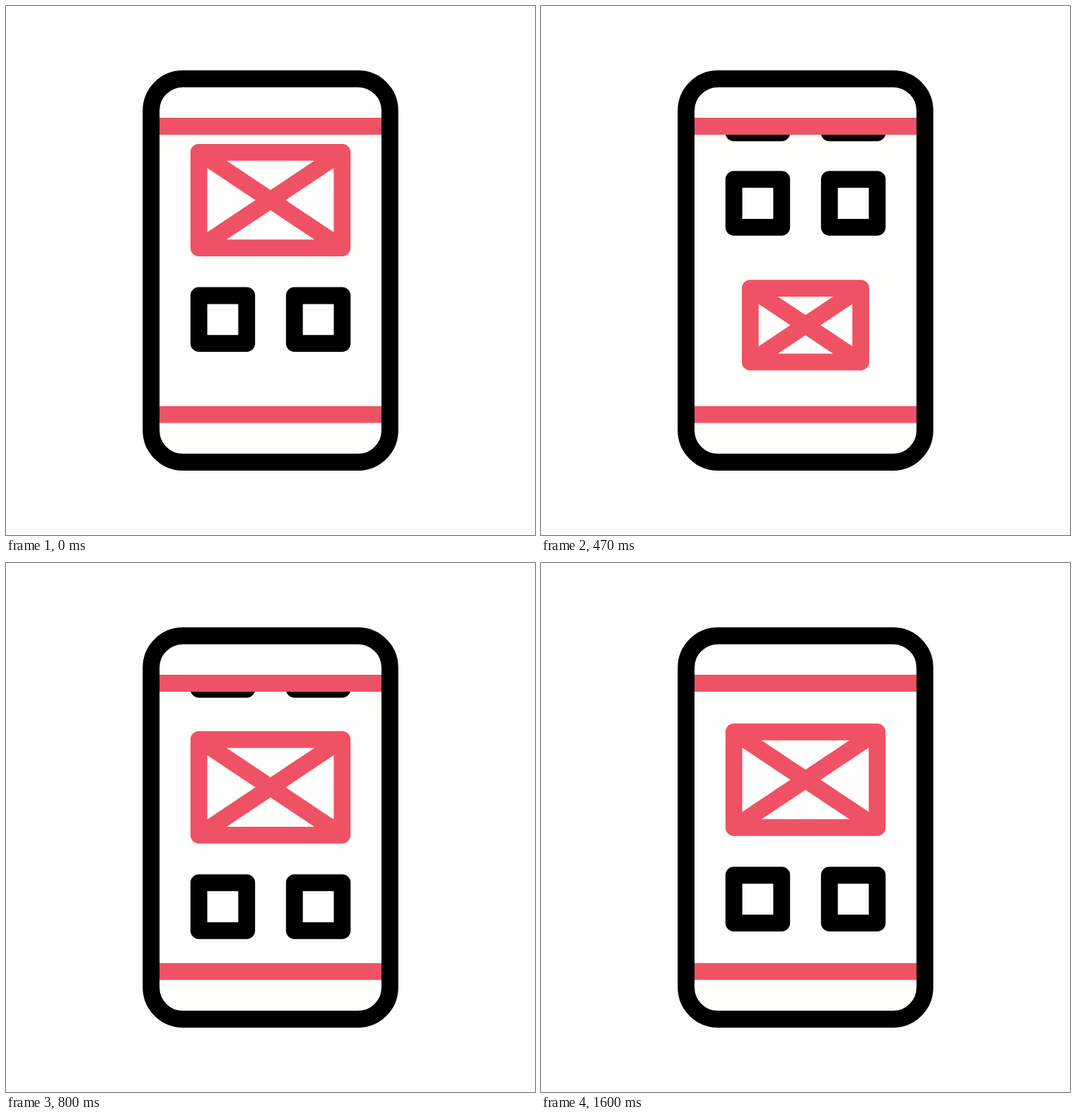
Recreate the animation shown at these times as an HTML page with a canvas. Size 748 by 748 pixels, loop 1670 ms.

```html
<!DOCTYPE html>
<html lang="en">
<head>
<meta charset="utf-8">
<title>Scrolling wireframe</title>
<style>
  html, body { margin: 0; width: 100%; height: 100%; overflow: hidden; background: #fefefc; }
  canvas { display: block; }
</style>
</head>
<body>
<canvas id="stage" width="748" height="748"></canvas>
<script>
const ctx = document.getElementById('stage').getContext('2d');
const LOOP = 1670;
const BACK = '#fefefc', INK = '#000', PINK = '#ef5265';
const TOP_BAR = 170, BOTTOM_BAR = 577.7;

// Scroll keys: [step, distance, speed per step]
const scrollKeys = [
  [0, 32, 17.2],
  [3, 116.7, 41.5],
  [7, 329.7, 47.5],
  [10, 431.7, 21.5],
  [12, 463.8, 9.4],
  [15, 474.5, 0]
];

// Resting centre of each row, and the step at which it starts to grow
const rows = [
  { draw: picture, y: 306.5, start: -10 },
  { draw: squares, y: 475.3, start: -10 },
  { draw: squares, y: 608.7, start: 0.4 },
  { draw: picture, y: 781, start: 2.86 },
  { draw: squares, y: 949.8, start: 4.4 }
];

// 15 steps a second, held for 70, 60 and 70 ms in turn
function stepAt(ms) {
  const rest = ms % 200;
  return Math.floor(ms / 200) * 3 + (rest >= 130 ? 2 : rest >= 70 ? 1 : 0);
}

function scrollAt(step) {
  const next = scrollKeys.findIndex(key => key[0] > step);
  if (next < 0) return scrollKeys[scrollKeys.length - 1][1];
  const [t0, p0, v0] = scrollKeys[next - 1];
  const [t1, p1, v1] = scrollKeys[next];
  const span = t1 - t0, u = (step - t0) / span, w = 1 - u;
  return p0 * (1 + 2 * u) * w * w + v0 * span * u * w * w
       + p1 * u * u * (3 - 2 * u) - v1 * span * u * u * w;
}

function growth(step, start) {
  const u = Math.min(1, Math.max(0, (step - start) / 6));
  return u * u * (3 - 2 * u);
}

function line(x0, y0, x1, y1) {
  ctx.beginPath();
  ctx.moveTo(x0, y0);
  ctx.lineTo(x1, y1);
  ctx.stroke();
}

function box(cx, cy, w, h) {
  ctx.strokeRect(cx - w / 2, cy - h / 2, w, h);
}

function picture(y, scale) {
  const w = 202.6 * scale, h = 135.2 * scale;
  const left = 374 - w / 2, right = 374 + w / 2;
  ctx.strokeStyle = PINK;
  box(374, y, w, h);
  line(left, y - h / 2, right, y + h / 2);
  line(left, y + h / 2, right, y - h / 2);
}

function squares(y, scale) {
  ctx.strokeStyle = INK;
  for (const x of [306.5, 441.6]) box(x, y, 67.6 * scale, 67.6 * scale);
}

function draw(ms) {
  const step = stepAt(ms), scroll = scrollAt(step);
  ctx.fillStyle = BACK;
  ctx.fillRect(0, 0, 748, 748);
  ctx.lineWidth = 23.8;
  ctx.lineJoin = 'round';

  ctx.save();
  ctx.beginPath();
  ctx.rect(205, TOP_BAR, 338, BOTTOM_BAR - TOP_BAR);
  ctx.clip();
  for (const row of rows) {
    const scale = growth(step, row.start);
    if (scale > 0) row.draw(row.y - scroll, scale);
  }
  ctx.restore();

  ctx.strokeStyle = PINK;
  line(205, TOP_BAR, 543, TOP_BAR);
  line(205, BOTTOM_BAR, 543, BOTTOM_BAR);

  ctx.strokeStyle = INK;
  ctx.beginPath();
  ctx.roundRect(205.2, 103, 337.6, 542, 45);
  ctx.stroke();
}

const begin = performance.now();
function tick() {
  draw((performance.now() - begin) % LOOP);
  requestAnimationFrame(tick);
}
tick();
</script>
</body>
</html>
```
